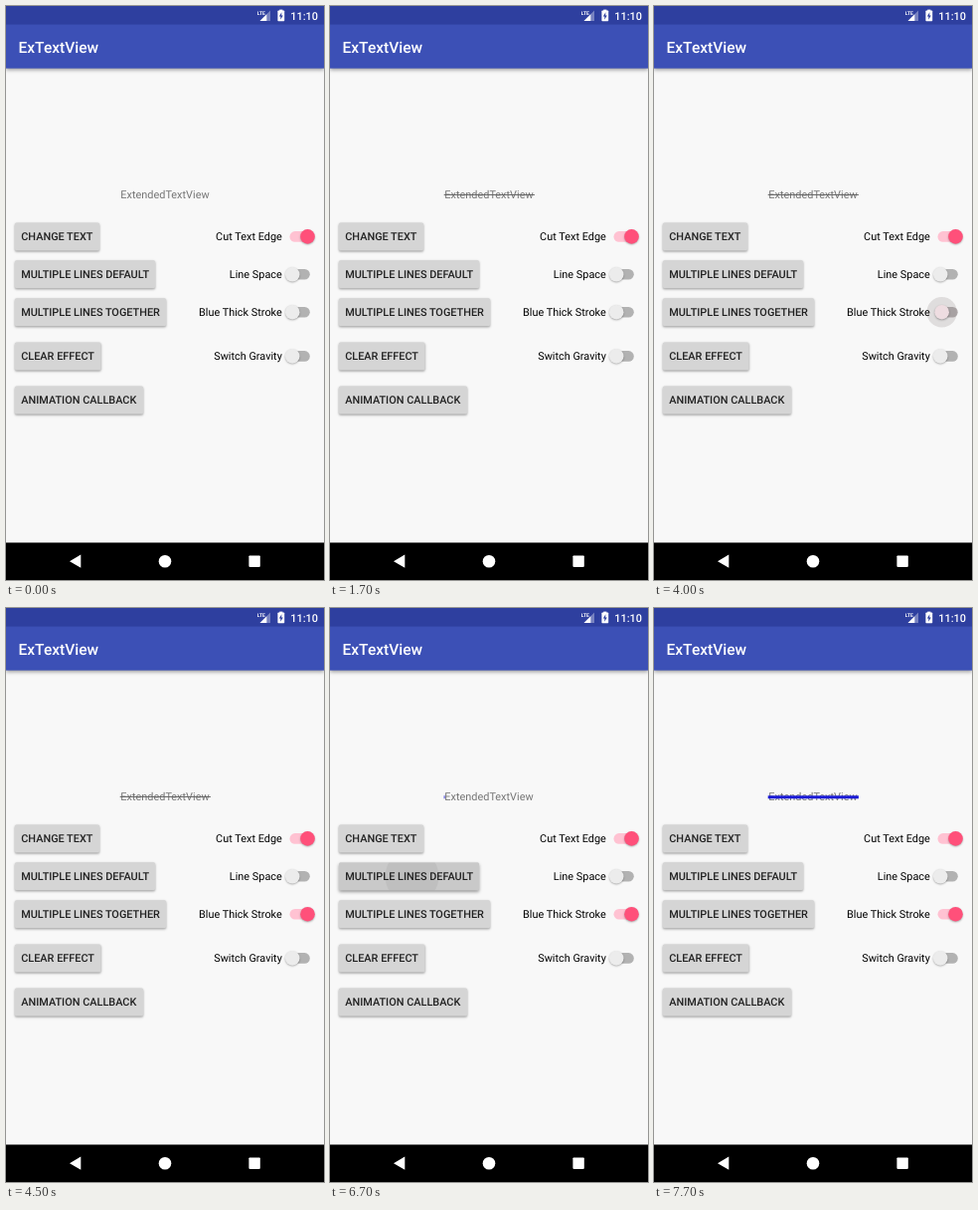
These frames come from a looping animation (320x576 px, 8 s). An HTML page with a canvas:

```html
<!DOCTYPE html>
<html lang="en">
<head>
<meta charset="utf-8">
<title>ExTextView</title>
<style>
html, body { margin: 0; width: 100%; height: 100%; overflow: hidden; background: #f8f8f8; }
canvas { display: block; width: 320px; height: 576px; }
</style>
</head>
<body>
<canvas id="stage"></canvas>
<script>
const W = 320, H = 576, LOOP = 8000, STEP = 100;
const FONT = 'Roboto, "Noto Sans", sans-serif';
const ACCENT = [255, 80, 122];

const canvas = document.getElementById('stage');
const ctx = canvas.getContext('2d');
const dpr = window.devicePixelRatio || 1;
canvas.width = W * dpr;
canvas.height = H * dpr;

// label, right edge, centre line
const buttons = [
  ['CHANGE TEXT', 94, 231.4],
  ['MULTIPLE LINES DEFAULT', 150, 269.3],
  ['MULTIPLE LINES TOGETHER', 161, 307.2],
  ['CLEAR EFFECT', 95.5, 351.4],
  ['ANIMATION CALLBACK', 138, 395.4]
];
const switches = [
  ['Cut Text Edge', 231.4],
  ['Line Space', 269.3],
  ['Blue Thick Stroke', 307.2],
  ['Switch Gravity', 351.4]
];

// each press of the second button: shadow rise, ripple, line start and style
const presses = [
  { raise: 100, tap: 800, x: 61.5, r: 40, start: 700, color: '#686868', y: 189, h: 1 },
  { raise: 5600, tap: 6700, x: 82.5, r: 27, start: 6670, color: '#1a1ad6', y: 188.3, h: 3 }
];

const clamp = v => Math.max(0, Math.min(1, v));
const ramp = (t, start, length) => clamp((t - start) / length);
const ease = k => (1 - Math.cos(Math.PI * k)) / 2;
const mix = (a, b, k) =>
  `rgb(${a.map((v, i) => Math.round(v + (b[i] - v) * k)).join(',')})`;

function rect(x, y, w, h, fill) {
  ctx.fillStyle = fill;
  ctx.fillRect(x, y, w, h);
}

function roundRect(x, y, w, h, r, fill) {
  ctx.beginPath();
  ctx.roundRect(x, y, w, h, r);
  ctx.fillStyle = fill;
  ctx.fill();
}

function circle(x, y, r, fill) {
  ctx.beginPath();
  ctx.arc(x, y, r, 0, Math.PI * 2);
  ctx.fillStyle = fill;
  ctx.fill();
}

function poly(points, fill) {
  ctx.beginPath();
  points.forEach(([x, y]) => ctx.lineTo(x, y));
  ctx.closePath();
  ctx.fillStyle = fill;
  ctx.fill();
}

function text(str, x, y, size, weight, fill, align = 'left') {
  ctx.font = `${weight} ${size}px ${FONT}`;
  ctx.textAlign = align;
  ctx.fillStyle = fill;
  ctx.fillText(str, x, y);
}

function withShadow(dy, blur, alpha, draw) {
  ctx.save();
  ctx.shadowColor = `rgba(0,0,0,${alpha})`;
  ctx.shadowOffsetY = dy * dpr;
  ctx.shadowBlur = blur * dpr;
  draw();
  ctx.restore();
}

function drawBars() {
  withShadow(1.2, 4, 0.4, () => rect(0, 0, W, 62.6, '#3c50b6'));
  rect(0, 0, W, 18.6, '#2e3f9f');
  text('ExTextView', 12.5, 46.9, 15.56, 500, '#fff');

  text('LTE', 252.8, 8.6, 5, 700, '#fff');
  poly([[266, 4.5], [266, 15], [255.5, 15]], 'rgba(255,255,255,.35)');
  poly([[262.3, 8.2], [262.3, 15], [255.5, 15]], '#fff');
  rect(275.2, 3.6, 3.2, 2, '#fff');
  roundRect(273.4, 4.6, 6.8, 10.6, 0.7, '#fff');
  poly([[277.4, 6.3], [274.8, 10.6], [276.4, 10.6], [276.2, 13.7], [278.8, 9.4], [277.2, 9.4]], '#2e3f9f');
  text('11:10', 314, 13.6, 10.9, 500, '#fff', 'right');

  rect(0, 538.5, W, H - 538.5, '#000');
  poly([[64, 557.2], [75.3, 550.6], [75.3, 563.8]], '#fff');
  circle(160, 557.2, 6.3, '#fff');
  roundRect(244.4, 551.5, 11.4, 11.4, 0.8, '#fff');
}

function drawButton([label, right, cy], press, t) {
  const x = 9, y = cy - 14, w = right - x, h = 28;
  const raised = press && t >= press.raise && t < press.tap + 500;
  withShadow(raised ? 1.7 : 1, raised ? 3.5 : 2.4, 0.4,
    () => roundRect(x, y, w, h, 1.5, '#d5d5d5'));

  if (press && t >= press.tap) {
    const u = t - press.tap;
    const fade = 1 - ramp(u, 0, 500);
    ctx.save();
    ctx.beginPath();
    ctx.roundRect(x, y, w, h, 1.5);
    ctx.clip();
    rect(x, y, w, h, `rgba(0,0,0,${0.06 * fade})`);
    const k = ramp(u, 0, 300);
    circle(press.x + (79.5 - press.x) * k, cy, press.r + (78 - press.r) * k,
      `rgba(0,0,0,${0.05 * fade})`);
    ctx.restore();
  }
  text(label, 15.2, cy + 3.9, 10.9, 500, '#212121');
}

function drawSwitch([label, cy], on, ripple) {
  text(label, 277.8, cy + 4, 10.9, 400, '#000', 'right');
  const x = 288.2 + 15.3 * on;
  roundRect(285.5, cy - 5.3, 20.3, 10.6, 5.3, mix([178, 178, 178], [255, 194, 210], on));
  if (ripple) {
    const tint = mix([0, 0, 0], ACCENT, on).slice(4, -1);
    circle(x, cy, 15.2 * ripple.size, `rgba(${tint},${ripple.alpha})`);
  }
  withShadow(0.8, 2, 0.32, () => circle(x, cy, 7.3, mix([236, 236, 236], ACCENT, on)));
}

function drawLine(t) {
  text('ExtendedTextView', 160, 193.3, 10.9, 400, '#757575', 'center');
  const p = presses.filter(p => t > p.start).pop();
  // the first line stays until the second one starts
  if (p) rect(114.7, p.y, 90.6 * ease(ramp(t, p.start, 1000)) + 0.6, p.h, p.color);
}

function draw(t) {
  ctx.setTransform(dpr, 0, 0, dpr, 0, 0);
  ctx.textRendering = 'geometricPrecision';
  rect(0, 0, W, H, '#f8f8f8');
  drawBars();
  drawLine(t);

  const press = presses.filter(p => t >= p.raise).pop();
  buttons.forEach((b, i) => drawButton(b, i === 1 && press, t));

  const slide = ease(ramp(t, 3950, 250));
  const grow = ramp(t, 2800, 300);
  const alpha = 0.12 * grow * (1 - ramp(t, 3950, 550));
  const ripple = alpha > 0 && { size: 0.6 + 0.4 * grow, alpha };
  switches.forEach((s, i) => drawSwitch(s, [1, 0, slide, 0][i], i === 2 && ripple));
}

const origin = performance.now();
function tick() {
  const t = (performance.now() - origin) % LOOP;
  draw(Math.floor(t / STEP) * STEP);
  requestAnimationFrame(tick);
}
tick();
</script>
</body>
</html>
```
